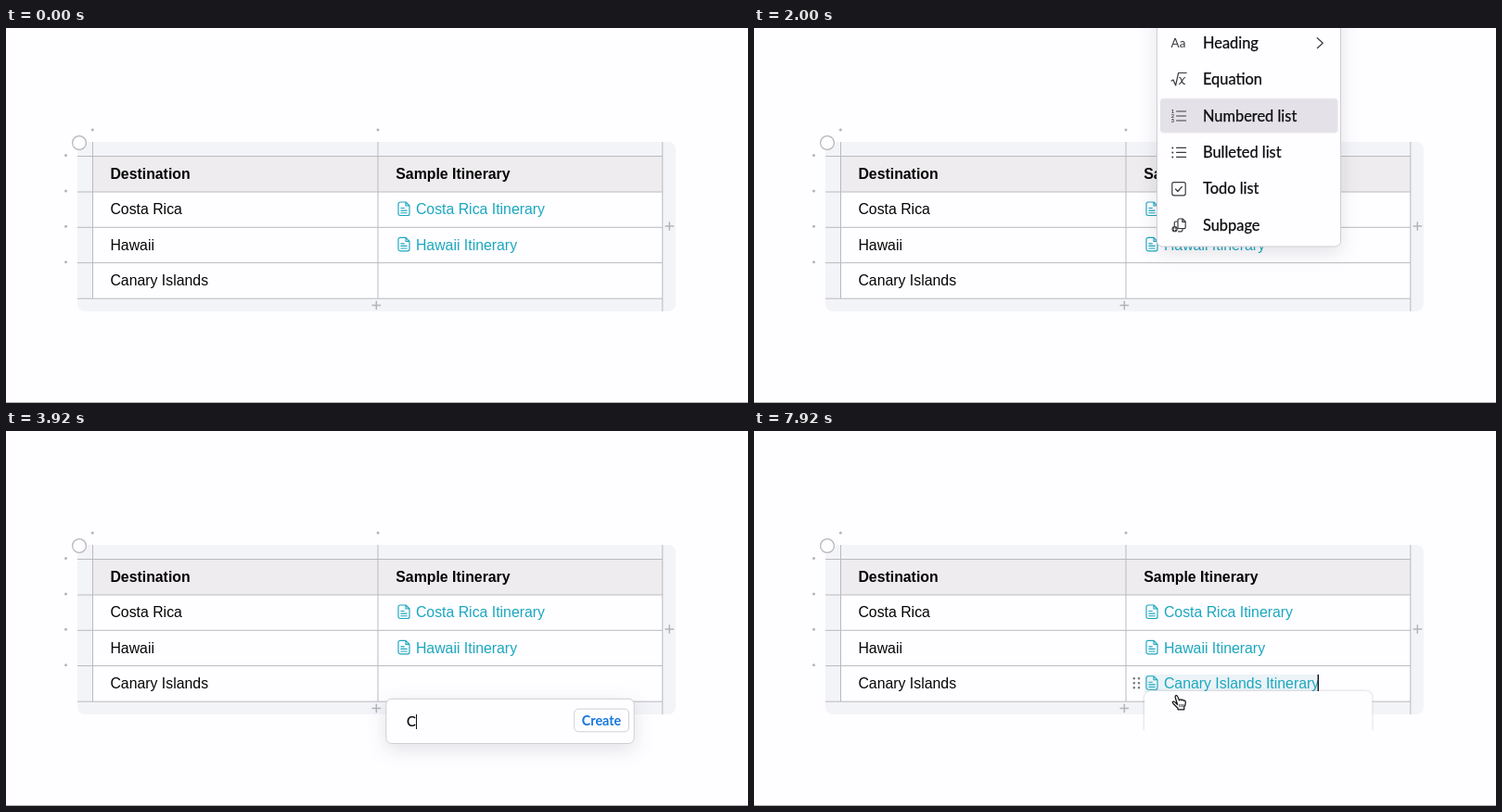
These frames come from a looping animation (800 by 405 pixels, 8000 ms). An HTML page:

```html
<!DOCTYPE html>
<html lang="en">
<head>
<meta charset="utf-8">
<title>Insert subpage in table</title>
<style>
  html, body { margin: 0; width: 100%; height: 100%; overflow: hidden; background: #fefdff; }
  #stage { position: absolute; left: 0; top: 0; width: 800px; height: 405px; overflow: hidden; }
  svg { position: absolute; left: 0; top: 0; }

  .cell { font: 15.85px "Liberation Sans", Arial, sans-serif; fill: #050505; }
  .head { font-weight: 700; }
  .link { fill: #1aa7bf; }
  .grid { stroke: #bababe; fill: none; }
  .dot { fill: #b4b4b8; }
  .plus { stroke: #b4b4b8; stroke-width: 1.5; }
  .doc { fill: none; stroke: #1aa7bf; stroke-width: 1.15; stroke-linejoin: round; stroke-linecap: round; }

  .panel { fill: #fefdff; stroke: #cfced4; filter: drop-shadow(0 6px 10px rgba(40, 40, 60, .13)); }
  .item { font: 16.4px Lato, "Open Sans", sans-serif; fill: #0c0c0e; stroke: #0c0c0e; stroke-width: .25; }
  .icon { fill: none; stroke: #3a3a3e; stroke-width: 1.2; stroke-linecap: round; stroke-linejoin: round; }
  .icon text, .tiny { fill: #3a3a3e; stroke: none; font-family: Lato, sans-serif; }
  .create { font: 700 14.4px Lato, "Open Sans", sans-serif; fill: #1877dc; }

  #entry { position: absolute; left: 432px; top: 303px; height: 20px; white-space: pre;
           font: 14.7px/20px Lato, "Open Sans", sans-serif; color: #0c0c0e; -webkit-text-stroke: .2px #0c0c0e; }
  #entry i { display: inline-block; width: 1.4px; height: 16px; margin-left: .5px; background: #111; vertical-align: -3px; }

  .menu, .bar, .caret, .popup, #entry i, .made, .hover, .preview {
    animation: 8s step-end infinite;
  }
  .menu { animation-name: menu; }
  .bar { animation-name: bar; }
  .caret { animation-name: caret; }
  .popup { animation-name: popup; }
  #entry i { animation-name: blink; }
  .made { animation-name: made; }
  .hover { animation-name: hover; }
  .preview { animation-name: preview; }

  @keyframes menu { 0% { opacity: 0 } 13.4% { opacity: 1 } 36.4%, 100% { opacity: 0 } }
  @keyframes bar {
    0% { transform: translateY(0) }
    19.65% { transform: translateY(39.4px) }
    24.9% { transform: translateY(78.8px) }
    25.9% { transform: translateY(118.2px) }
    27% { transform: translateY(157.6px) }
    29%, 100% { transform: translateY(197px) }
  }
  @keyframes caret {
    0% { opacity: 0 } 6.15% { opacity: 1 } 11.4% { opacity: 0 }
    16.5% { opacity: 1 } 21.8% { opacity: 0 } 25.9% { opacity: 1 }
    30.15% { opacity: 0 } 35.25% { opacity: 1 } 37.4%, 100% { opacity: 0 }
  }
  @keyframes popup { 0% { opacity: 0 } 37.4% { opacity: 1 } 80.15%, 100% { opacity: 0 } }
  @keyframes blink { 0% { opacity: 1 } 41.5% { opacity: 0 } 45.8%, 100% { opacity: 1 } }
  @keyframes made { 0% { opacity: 0 } 95.75%, 100% { opacity: 1 } }
  @keyframes hover { 0% { opacity: 0 } 96.8%, 100% { opacity: 1 } }
  @keyframes preview { 0% { opacity: 0 } 97.8% { opacity: .5 } 98.9%, 100% { opacity: 1 } }
</style>
</head>
<body>
<div id="stage">
  <svg width="800" height="405" viewBox="0 0 800 405">
    <defs>
      <path id="doc" class="doc" d="M2 .5h6l4 4V13a2 2 0 0 1-2 2H2a2 2 0 0 1-2-2V2.5a2 2 0 0 1 2-2zM8 .5v4h4M2.8 7h3.5M2.8 9.6h6.4M2.8 12.2h6.4"/>
      <path id="plus" class="plus" d="M-4.8 0h9.6M0-4.8v9.6"/>
      <clipPath id="cut"><rect x="408" y="262" width="260" height="61"/></clipPath>
    </defs>

    <!-- table -->
    <rect x="77" y="123" width="645" height="183" rx="8" fill="#f3f4f8"/>
    <rect x="93" y="138" width="615" height="154" fill="#fefdff"/>
    <rect x="93" y="138" width="615" height="39" fill="#eeecee"/>
    <path class="grid" d="M77 138.5H708M77 177H708M77 215.3H708M77 253.6H708M77 292.2H708M93.5 123V292M401 123V292M707.8 123V306"/>
    <circle cx="79" cy="124" r="7.4" fill="#fefdff" stroke="#b4b4b8" stroke-width="1.2"/>
    <g class="dot">
      <circle cx="93.3" cy="110" r="1.5"/><circle cx="401" cy="110" r="1.5"/>
      <circle cx="64.5" cy="137.5" r="1.5"/><circle cx="64.5" cy="176" r="1.5"/>
      <circle cx="64.5" cy="214.3" r="1.5"/><circle cx="64.5" cy="252.7" r="1.5"/>
    </g>
    <use href="#plus" x="715.3" y="214"/>
    <use href="#plus" x="399.3" y="299.5"/>
    <path d="M0 404.5H800" stroke="#b0b0b3"/>

    <g class="cell">
      <text class="head" x="112.4" y="162.8">Destination</text>
      <text class="head" x="420.3" y="162.8">Sample Itinerary</text>
      <text x="112.4" y="201.4">Costa Rica</text>
      <text x="112.4" y="239.7">Hawaii</text>
      <text x="112.4" y="278.2">Canary Islands</text>
      <text class="link" x="441.9" y="201.4">Costa Rica Itinerary</text>
      <text class="link" x="441.9" y="239.7">Hawaii Itinerary</text>
    </g>
    <use href="#doc" x="423" y="187.5"/>
    <use href="#doc" x="423" y="225.8"/>
    <rect class="caret" x="421" y="264" width="1.5" height="18" fill="#111"/>

    <!-- new link -->
    <g class="made">
      <rect x="421" y="263" width="187" height="19" fill="#ebf3f7"/>
      <use href="#doc" x="423" y="264.3"/>
      <text class="cell link" x="441.9" y="278.2">Canary Islands Itinerary</text>
      <rect x="607.6" y="263" width="1.4" height="18" fill="#111"/>
    </g>
    <g class="preview" clip-path="url(#cut)">
      <rect x="421" y="281" width="245.5" height="80" rx="7" fill="#fefdff" style="filter: drop-shadow(0 0 1.5px rgba(40, 40, 60, .25))"/>
    </g>
    <g class="hover">
      <path d="M409.8 267.2h0M415 267.2h0M409.8 272.2h0M415 272.2h0M409.8 277.2h0M415 277.2h0" stroke="#77777c" stroke-width="2.6" stroke-linecap="round"/>
      <path d="M456.6 295.5L454.2 287.8C453.6 285.4 456 284.8 456.8 286.9L458.5 291C458.7 289.4 460.8 289.4 461 291C461.6 289.8 463.2 290 463.3 291.5C464.2 290.6 465.3 291.2 465.3 292.6C465.4 295.5 464.8 296.8 463.8 298.2V300.8H457V299.2C455.2 297.8 453.4 295.8 451.6 293.9C450.4 292.4 452.2 291.4 453.6 292.6Z" fill="#fff" stroke="#111" stroke-width="1.2" stroke-linejoin="round"/>
      <path d="M458.8 295v3.2M460.8 295v3.2M462.7 295v3.2" stroke="#111" stroke-width=".8"/>
    </g>

    <!-- block menu -->
    <g class="menu">
      <rect class="panel" x="434.5" y="-40" width="198" height="276" rx="6"/>
      <rect class="bar" x="438" y="-2.8" width="191.5" height="37.4" rx="4" fill="#e4e2e8"/>
      <g class="item" id="items"></g>
      <g class="icon">
        <text x="449.5" y="20.8" font-size="13.5">Aa</text>
        <path d="M607.3 10.7l6 5.5-6 5.5"/>
        <path d="M450 57l2-1 2.6 6 3-13.5h8.6M458.8 53.5c2.5-.8 2.2 8 5.6 7M464.6 53.5c-2.2 0-4 7.2-6.2 7"/>
        <path d="M455.6 90h10M455.6 95h10M455.6 100h10"/>
        <path d="M455.6 129.4h10M455.6 134.4h10M455.6 139.4h10"/>
        <path d="M451.3 129.4h0M451.3 134.4h0M451.3 139.4h0" stroke-width="2"/>
        <rect x="450.8" y="166.6" width="14.4" height="14.2" rx="2"/>
        <path d="M454.6 174l2.3 2.5 4.4-5"/>
        <path d="M457 216.5v-9a1.5 1.5 0 0 1 1.5-1.5h3.5l3.2 3.2v6a1.5 1.5 0 0 1-1.5 1.5zM461.8 206v3.4h3.4M456.8 209h-2a1.5 1.5 0 0 0-1.5 1.5v3M457.5 219.8h3a1.5 1.5 0 0 0 1.5-1.5v-1.5"/>
        <circle cx="453.6" cy="217.2" r="3.1" fill="#3a3a3e" stroke="none"/>
        <path d="M452 217.2h3.2M453.6 215.6v3.2" stroke="#fff" stroke-width=".8"/>
      </g>
      <g class="tiny" font-size="5.6" font-weight="700">
        <text x="449.7" y="91.8">1</text><text x="449.7" y="97">2</text><text x="449.7" y="102.2">3</text>
      </g>
    </g>

    <!-- name popup -->
    <g class="popup">
      <rect class="panel" x="409.8" y="289.3" width="267.4" height="48.2" rx="6"/>
      <rect x="612.7" y="300.2" width="58.8" height="24.6" rx="4.5" fill="#fefdff" stroke="#d0cfd6"/>
      <text class="create" x="642" y="317.8" text-anchor="middle">Create</text>
    </g>
  </svg>
  <div class="popup"><div id="entry"><span id="typed"></span><i></i></div></div>
</div>

<script>
  const LOOP = 8000;
  const NAME = "Canary Islands Itinerary";
  // time at which each letter of NAME is typed
  const KEYS = [
    3920, 4000, 4080, 4170, 4250, 4330, 4420,
    4580, 4750, 4920, 5000, 5170, 5250, 5330, 5330,
    5500, 5670, 5750, 5830, 5920, 6000, 6080, 6170, 6250
  ];
  const LEAD = 8;

  const items = document.getElementById("items");
  ["Heading", "Equation", "Numbered list", "Bulleted list", "Todo list", "Subpage"].forEach((label, i) => {
    const text = document.createElementNS(items.namespaceURI, "text");
    text.setAttribute("x", 484);
    text.setAttribute("y", 21.8 + 39.4 * i);
    text.textContent = label;
    items.append(text);
  });

  const typed = document.getElementById("typed");
  let start;

  function draw(now) {
    start ??= now;
    const t = (now - start) % LOOP + LEAD;
    const text = NAME.slice(0, KEYS.filter(k => k <= t).length);
    if (typed.textContent !== text) typed.textContent = text;
    requestAnimationFrame(draw);
  }
  requestAnimationFrame(draw);
</script>
</body>
</html>
```
